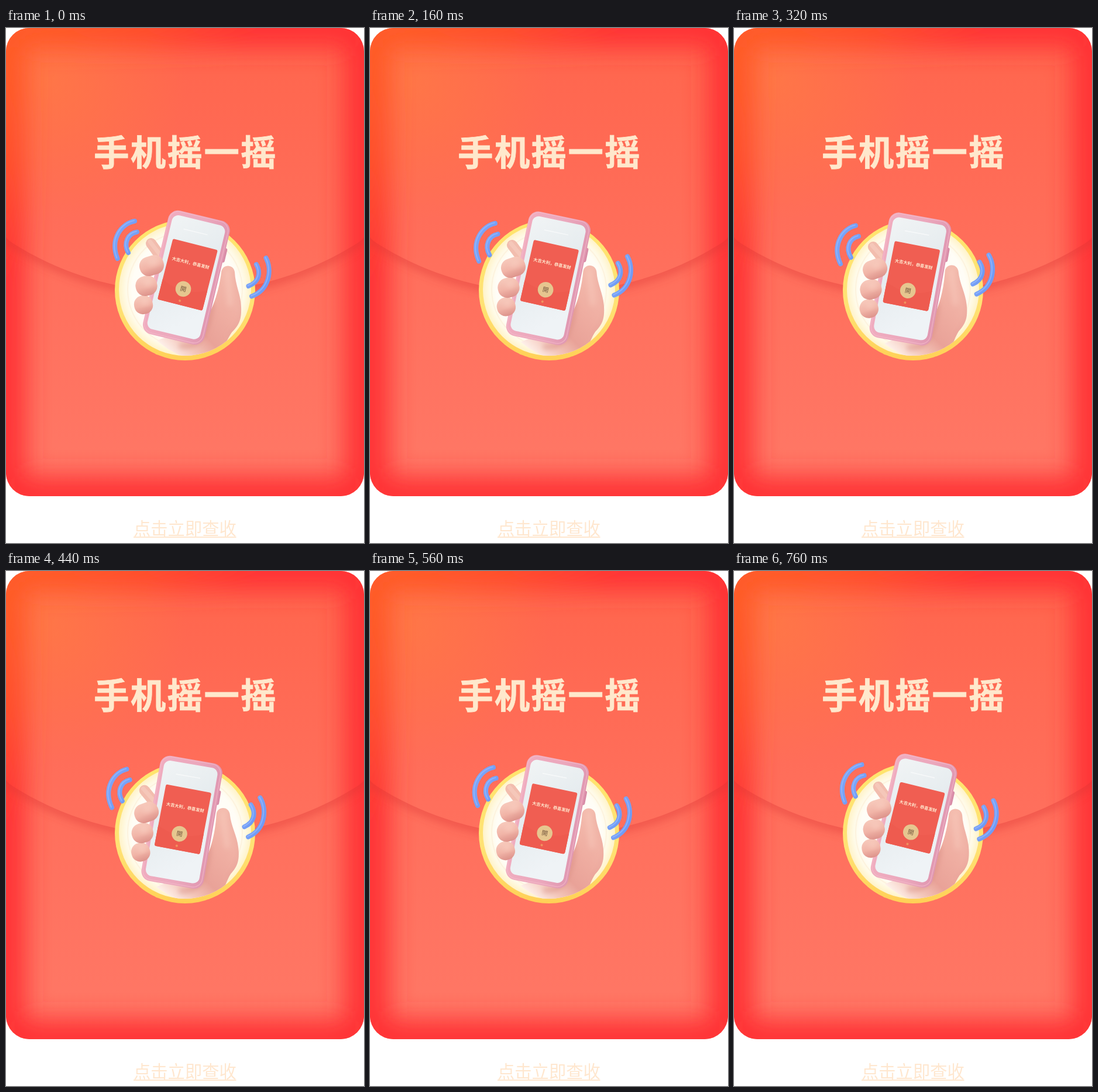
Write an HTML page that moves like this. It is 612 px wide and 880 px high and loops after 800 ms.

```html
<!DOCTYPE html>
<html lang="zh-CN">
<head>
<meta charset="utf-8">
<style>
html, body { margin: 0; width: 100%; height: 100%; overflow: hidden; background: #fff; }
svg { display: block; width: 612px; height: 880px; }
text { font-family: "Noto Sans CJK SC", "Noto Sans CJK", sans-serif; }
</style>
</head>
<body>
<svg viewBox="0 0 612 880" xmlns="http://www.w3.org/2000/svg">
  <defs>
    <linearGradient id="base" x2="0" y2="1">
      <stop stop-color="#ff654c"/><stop offset=".5" stop-color="#ff6f5c"/><stop offset="1" stop-color="#ff7866"/>
    </linearGradient>
    <radialGradient id="warm" gradientUnits="userSpaceOnUse" cx="70" cy="90" r="240">
      <stop stop-color="#ff7c44" stop-opacity=".7"/><stop offset="1" stop-color="#ff7c44" stop-opacity="0"/>
    </radialGradient>
    <linearGradient id="edge" gradientUnits="userSpaceOnUse" x1="0" y1="60" x2="250" y2="310">
      <stop stop-color="#ff5a26"/><stop offset=".35" stop-color="#ff4d2b"/><stop offset=".75" stop-color="#ff3034"/>
      <stop offset="1" stop-color="#ff3335"/>
    </linearGradient>
    <linearGradient id="ring" x2="0" y2="1">
      <stop stop-color="#ffe46c"/><stop offset=".6" stop-color="#ffe274"/><stop offset="1" stop-color="#ffd056"/>
    </linearGradient>
    <radialGradient id="disc">
      <stop stop-color="#fff"/><stop offset=".8" stop-color="#fffdf6"/><stop offset=".9" stop-color="#fffae6"/>
      <stop offset="1" stop-color="#fff3c8"/>
    </radialGradient>
    <linearGradient id="palm" gradientUnits="userSpaceOnUse" x1="395" y1="425" x2="268" y2="548">
      <stop stop-color="#f4bcae"/><stop offset=".35" stop-color="#efada1"/><stop offset=".62" stop-color="#e9a298"/>
      <stop offset=".8" stop-color="#f3c6ba"/><stop offset="1" stop-color="#fff4ee"/>
    </linearGradient>
    <linearGradient id="skin" x1=".4" y1="0" x2=".45" y2="1">
      <stop stop-color="#f7c9bb"/><stop offset=".55" stop-color="#f1b4a7"/><stop offset="1" stop-color="#dd938b"/>
    </linearGradient>
    <linearGradient id="frame">
      <stop stop-color="#f0acbf"/><stop offset=".6" stop-color="#eba7bc"/><stop offset="1" stop-color="#e097b1"/>
    </linearGradient>
    <linearGradient id="glass" x2=".4" y2="1">
      <stop stop-color="#f1f4f5"/><stop offset=".5" stop-color="#e6ecef"/><stop offset="1" stop-color="#eff3f6"/>
    </linearGradient>
    <linearGradient id="blue" x2="1" y2="1">
      <stop stop-color="#7fa9fa"/><stop offset="1" stop-color="#6c97f3"/>
    </linearGradient>
    <filter id="glow" filterUnits="userSpaceOnUse" x="-120" y="-120" width="860" height="1060"><feGaussianBlur stdDeviation="21"/></filter>
    <filter id="soft" filterUnits="userSpaceOnUse" x="-60" y="300" width="740" height="240"><feGaussianBlur stdDeviation="8"/></filter>
    <filter id="tiny" x="-30%" y="-30%" width="160%" height="160%"><feGaussianBlur stdDeviation="4"/></filter>
    <clipPath id="card"><rect width="612" height="800" rx="40"/></clipPath>
    <clipPath id="below"><path d="M0 357Q4 363 12 368C190 480 422 480 600 368Q608 363 612 357V800H0Z"/></clipPath>
    <clipPath id="hole"><circle cx="306" cy="447" r="113"/></clipPath>
    <clipPath id="hand"><use href="#palmShape"/></clipPath>
  </defs>

  <g clip-path="url(#card)">
    <rect width="612" height="800" fill="url(#base)"/>
    <rect width="612" height="400" fill="url(#warm)"/>
    <rect width="612" height="800" rx="40" fill="none" stroke="url(#edge)" stroke-width="66" filter="url(#glow)"/>
    <g clip-path="url(#below)">
      <path d="M-30 345Q4 363 12 368C190 480 422 480 600 368Q608 363 642 345" fill="none" stroke="#dd3434" stroke-width="15" opacity=".5" filter="url(#soft)"/>
    </g>
  </g>

  <text x="150" y="234.5" font-size="60.500" font-weight="700" letter-spacing="2.300" fill="#ffe8cc" stroke="#ffe8cc" stroke-width=".8">手机摇一摇</text>
  <text x="218" y="866" font-size="29.3" fill="#ffe7cf">点击立即查收</text>
  <rect x="218" y="869" width="175.5" height="2" fill="#ffe7cf"/>

  <circle cx="306" cy="448" r="120" fill="url(#ring)"/>
  <circle cx="306" cy="447" r="113" fill="url(#disc)"/>
  <circle cx="306" cy="447" r="98" fill="none" stroke="#fdf3de" stroke-width="2"/>

  <g clip-path="url(#hole)">
    <g class="shake">
      <path id="palmShape" d="M368 418C369 403 389 403 391 417C392 440 401 454 402 476C403 499 398 508 386 520C379 530 377 538 371 546C352 566 318 566 300 560C282 553 270 544 258 534L335 505C352 488 364 450 368 418Z" fill="url(#palm)"/>
      <g clip-path="url(#hand)" fill="none" filter="url(#tiny)">
        <path d="M391 414C392 440 402 454 403 478C403 500 394 512 380 527" stroke="#e29a91" stroke-width="4" opacity=".5"/>
        <path d="M352 470C350 490 345 510 334 529C326 541 312 546 296 543" stroke="#d4857f" stroke-width="8" opacity=".5"/>
        <path d="M379 414C379 440 383 457 383 475" stroke="#f9cdbf" stroke-width="8" opacity=".5"/>
      </g>
    </g>
  </g>

  <g class="shake">
    <path d="M248 368L265 392" stroke="#f2bdae" stroke-width="18" stroke-linecap="round"/>
    <path d="M246 365L264 388" stroke="#f7cfc1" stroke-width="7" stroke-linecap="round" opacity=".6"/>

    <g transform="translate(308.5 426) rotate(13.5)">
      <rect x="51" y="-64" width="6" height="25" rx="3" fill="#d88ca7"/>
      <rect x="-54" y="-108" width="108" height="217" rx="17" fill="url(#frame)"/>
      <rect x="-52" y="-106.500" width="103" height="213" rx="16" fill="none" stroke="#f6bdcc" stroke-width="1.500" opacity=".6"/>
      <rect x="-47" y="-100" width="93" height="200" rx="11" fill="url(#glass)"/>
      <path d="M-24 -79H18" stroke="#fff" stroke-width="1.500" opacity=".6"/>
    </g>

    <g transform="translate(310.5 421.500) rotate(14.3)">
      <rect x="-39.500" y="-53.500" width="79" height="107" rx="3" fill="#f05e52"/>
      <path d="M-39.500 18Q0 38 39.500 18V50.500a3 3 0 0 1-3 3h-73a3 3 0 0 1-3-3Z" fill="#ee5b4f"/>
      <text y="-18" font-size="7.300" font-weight="700" text-anchor="middle" fill="#ffe9cf">大吉大利，恭喜发财</text>
      <circle cx="-1.200" cy="25.500" r="13.300" fill="#e6c68f"/>
      <text x="-1.200" y="29.300" font-size="10.500" font-weight="500" text-anchor="middle" fill="#75583f">開</text>
      <circle cx="-2" cy="46.500" r="2" fill="#f0925f"/>
    </g>

    <g id="fingers"></g>

    <g fill="none" stroke-linecap="round">
      <g id="waves" stroke="url(#blue)" stroke-width="8"></g>
      <g id="shine" stroke="#9dbeff" stroke-width="2" opacity=".6" transform="translate(-1 -1)"></g>
    </g>
  </g>
</svg>
<script>
const LOOP = 800, STEP = 40, SWING = 4;
const get = id => document.getElementById(id);

const arcs = [
  'M220 330C198 334 177 360 190.500 394',
  'M224 348.500C209 351 200 367 209 384',
  'M444.500 393C455 413 451 447 420 458.500',
  'M428 404C436 418 433 434 414.500 441'
].map(d => `<path d="${d}"/>`).join('');
get('waves').innerHTML = arcs;
get('shine').innerHTML = arcs;

// centre x, y, half width, half height, tilt
get('fingers').innerHTML = [
  [235, 473, 16, 16, -12],
  [240, 440.500, 18.500, 17, -12],
  [249, 406, 21, 16.500, -17]
].map(([x, y, w, h, tilt]) => `<g transform="translate(${x} ${y}) rotate(${tilt})">
  <rect x="${-w}" y="${-h}" width="${2 * w}" height="${2 * h}" rx="${h - 1}" fill="url(#skin)"/>
  <ellipse cx="${w * .25}" cy="${-h * .3}" rx="${w * .5}" ry="${h * .38}" fill="#fbd8ca" opacity=".45" filter="url(#tiny)"/>
</g>`).join('');

const shaken = document.querySelectorAll('.shake');

function draw(ms) {
  const t = Math.floor((ms % LOOP) / STEP) * STEP / LOOP;
  const angle = -SWING * (1 - Math.abs(1 - 2 * t));
  for (const g of shaken) g.setAttribute('transform', `rotate(${angle} 350 551)`);
}

let start;
function tick(now) {
  start ??= now;
  draw(now - start);
  requestAnimationFrame(tick);
}
draw(0);
requestAnimationFrame(tick);
</script>
</body>
</html>
```
